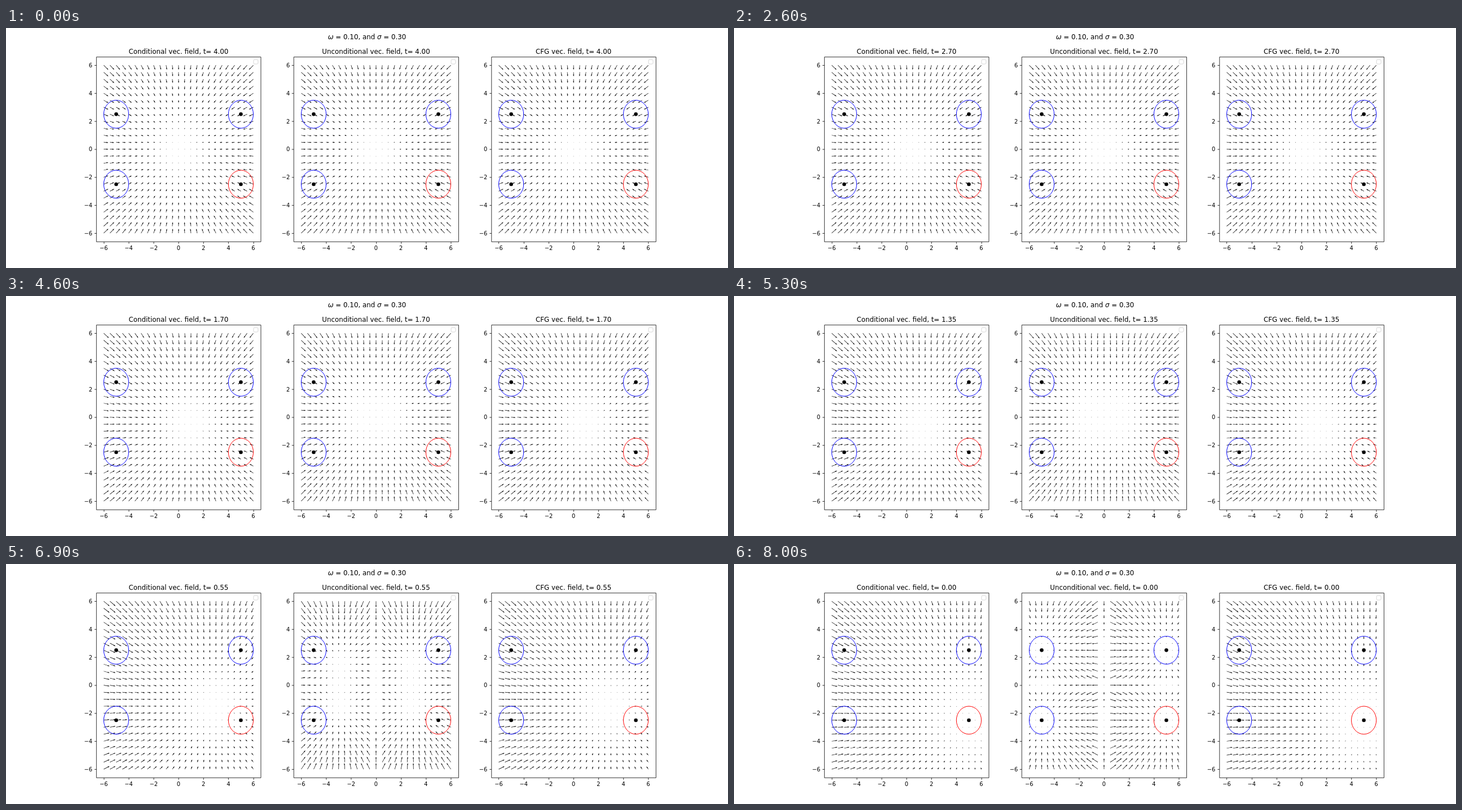
Recreate the animation shown at these times as an HTML page with a canvas. Size 1280 by 427 pixels, loop 8.1 s.

```html
<!DOCTYPE html>
<html lang="en">
<head>
<meta charset="utf-8">
<title>Guided vector fields</title>
<style>
html, body { margin: 0; width: 100%; height: 100%; overflow: hidden; background: #fff; }
canvas { display: block; width: 1280px; height: 427px; }
</style>
</head>
<body>
<canvas id="stage" width="1280" height="427"></canvas>
<script>
const ctx = document.getElementById('stage').getContext('2d');

// Figure space: 1800 x 600 units at 100 per inch
const FIG_W = 1800, FIG_H = 600;
const PT = 100 / 72;
const STEPS = 81, STEP_MS = 100, T_MAX = 4, DT = 0.05;
const OMEGA = 0.1, SIGMA = 0.3;
const CX = 5, CY = 2.5;

const AX_W = 0.775 * FIG_W / 3.4;
const AX_LEFT = 225, AX_GAP = AX_W * 1.2, TOP = 72, BOTTOM = 534;
const LIM = 6.6;
const UNIT_X = AX_W / (2 * LIM), UNIT_Y = (BOTTOM - TOP) / (2 * LIM);
const SHAFT = 0.06 / 25 * AX_W;
const FAMILY = '"DejaVu Sans", sans-serif';

const snap = v => Math.floor(v + 0.5) + 0.5;

// Score fields of a diffused Gaussian mixture with centres (±CX, ±CY)
function fieldsAt(t) {
  const decay = Math.exp(-t);
  const variance = SIGMA * SIGMA * decay * decay + 1 - decay * decay;
  const mx = CX * decay, my = CY * decay;
  const cond = (x, y) => [mx - x, -my - y];
  const uncond = (x, y) => [
    mx * Math.tanh(mx * x / variance) - x,
    my * Math.tanh(my * y / variance) - y
  ];
  const guided = (x, y) => {
    const c = cond(x, y), u = uncond(x, y);
    return c.map((v, i) => (1 + OMEGA) * v - OMEGA * u[i]);
  };
  return [['Conditional', cond], ['Unconditional', uncond], ['CFG', guided]];
}

// Adds one arrow to the path; len is in shaft widths
function addArrow(px, py, angle, len) {
  const cos = Math.cos(angle) * SHAFT, sin = Math.sin(angle) * SHAFT;
  let points;
  if (len < 1) {
    points = [0, 1, 2, 3, 4, 5].map(i => [Math.cos(i * Math.PI / 3) / 2, Math.sin(i * Math.PI / 3) / 2]);
  } else {
    const k = Math.min(1, len / 5);
    const neck = len - 4.5 * k, barb = len - 5 * k;
    points = [
      [0, 0.5 * k], [neck, 0.5 * k], [barb, 1.5 * k], [len, 0],
      [barb, -1.5 * k], [neck, -0.5 * k], [0, -0.5 * k]
    ];
  }
  points.forEach(([a, b], i) => {
    const x = px + a * cos - b * sin, y = py - a * sin - b * cos;
    if (i) ctx.lineTo(x, y); else ctx.moveTo(x, y);
  });
  ctx.closePath();
}

function drawQuiver(field, toX, toY) {
  const arrows = [];
  let sum = 0;
  for (let y = -6; y <= 6; y += 0.5) {
    for (let x = -6; x <= 6; x += 0.5) {
      const [u, v] = field(x, y);
      const size = Math.hypot(u, v);
      sum += size;
      arrows.push({ x, y, size, angle: Math.atan2(v, u) });
    }
  }
  // Typical length follows the mean magnitude
  const scale = AX_W / (1.8 * 25 * sum / arrows.length * SHAFT);
  ctx.fillStyle = '#000';
  ctx.beginPath();
  for (const a of arrows) addArrow(toX(a.x), toY(a.y), a.angle, a.size * scale);
  ctx.fill();
}

function drawCentres(toX, toY) {
  for (const x of [-CX, CX]) {
    for (const y of [-CY, CY]) {
      ctx.strokeStyle = x > 0 && y < 0 ? '#f00' : '#00f';
      ctx.lineWidth = PT;
      ctx.beginPath();
      ctx.ellipse(toX(x), toY(y), UNIT_X, UNIT_Y, 0, 0, 2 * Math.PI);
      ctx.stroke();
      ctx.fillStyle = '#000';
      ctx.beginPath();
      ctx.arc(toX(x), toY(y), 4.6, 0, 2 * Math.PI);
      ctx.fill();
    }
  }
}

function drawAxes(left, toX, toY) {
  const l = snap(left), r = snap(left + AX_W), t = snap(TOP), b = snap(BOTTOM);
  const tick = 3.5 * PT;
  ctx.strokeStyle = ctx.fillStyle = '#000';
  ctx.lineWidth = 0.8 * PT;
  ctx.font = 10 * PT + 'px ' + FAMILY;
  ctx.beginPath();
  ctx.rect(l, t, r - l, b - t);
  for (let v = -6; v <= 6; v += 2) {
    const x = snap(toX(v)), y = snap(toY(v));
    const label = String(v).replace('-', '\u2212');
    ctx.moveTo(x, b);
    ctx.lineTo(x, b + tick);
    ctx.moveTo(l, y);
    ctx.lineTo(l - tick, y);
    ctx.textAlign = 'center';
    ctx.fillText(label, toX(v), 555);
    ctx.textAlign = 'right';
    ctx.fillText(label, left - 2 * tick, toY(v) + 5.3);
  }
  ctx.stroke();
}

function drawEmptyLegend(left) {
  const size = 8 * PT, pad = 5 * PT;
  ctx.beginPath();
  ctx.roundRect(left + AX_W - pad - size, TOP + pad, size, size, 2 * PT);
  ctx.fillStyle = 'rgba(255,255,255,0.8)';
  ctx.fill();
  ctx.strokeStyle = 'rgba(204,204,204,0.8)';
  ctx.lineWidth = PT;
  ctx.stroke();
}

function drawHeading() {
  const parts = [
    ['\u03c9', 'italic '], [' = ' + OMEGA.toFixed(2) + ', and ', ''],
    ['\u03c3', 'italic '], [' = ' + SIGMA.toFixed(2), '']
  ];
  const setFont = style => { ctx.font = style + 12 * PT + 'px ' + FAMILY; };
  const widths = parts.map(([text, style]) => {
    setFont(style);
    return ctx.measureText(text).width;
  });
  let x = FIG_W / 2 - widths.reduce((a, w) => a + w, 0) / 2;
  ctx.fillStyle = '#000';
  ctx.textAlign = 'left';
  parts.forEach(([text, style], i) => {
    setFont(style);
    ctx.fillText(text, x, 27.5);
    x += widths[i];
  });
}

function draw(step) {
  const t = T_MAX - step * DT;
  ctx.setTransform(1280 / FIG_W, 0, 0, 427 / FIG_H, 0, 0);
  ctx.fillStyle = '#fff';
  ctx.fillRect(0, 0, FIG_W, FIG_H);
  drawHeading();
  fieldsAt(t).forEach(([name, field], i) => {
    const left = AX_LEFT + i * AX_GAP;
    const toX = x => left + (x + LIM) * UNIT_X;
    const toY = y => TOP + (LIM - y) * UNIT_Y;
    drawQuiver(field, toX, toY);
    drawCentres(toX, toY);
    drawAxes(left, toX, toY);
    drawEmptyLegend(left);
    ctx.fillStyle = '#000';
    ctx.textAlign = 'center';
    ctx.font = 12 * PT + 'px ' + FAMILY;
    ctx.fillText(name + ' vec. field, t= ' + Math.abs(t).toFixed(2), left + AX_W / 2, 64);
  });
}

let shown = -1;
function tick() {
  const step = Math.floor(performance.now() / STEP_MS) % STEPS;
  if (step !== shown) draw(shown = step);
  requestAnimationFrame(tick);
}
tick();
</script>
</body>
</html>
```
